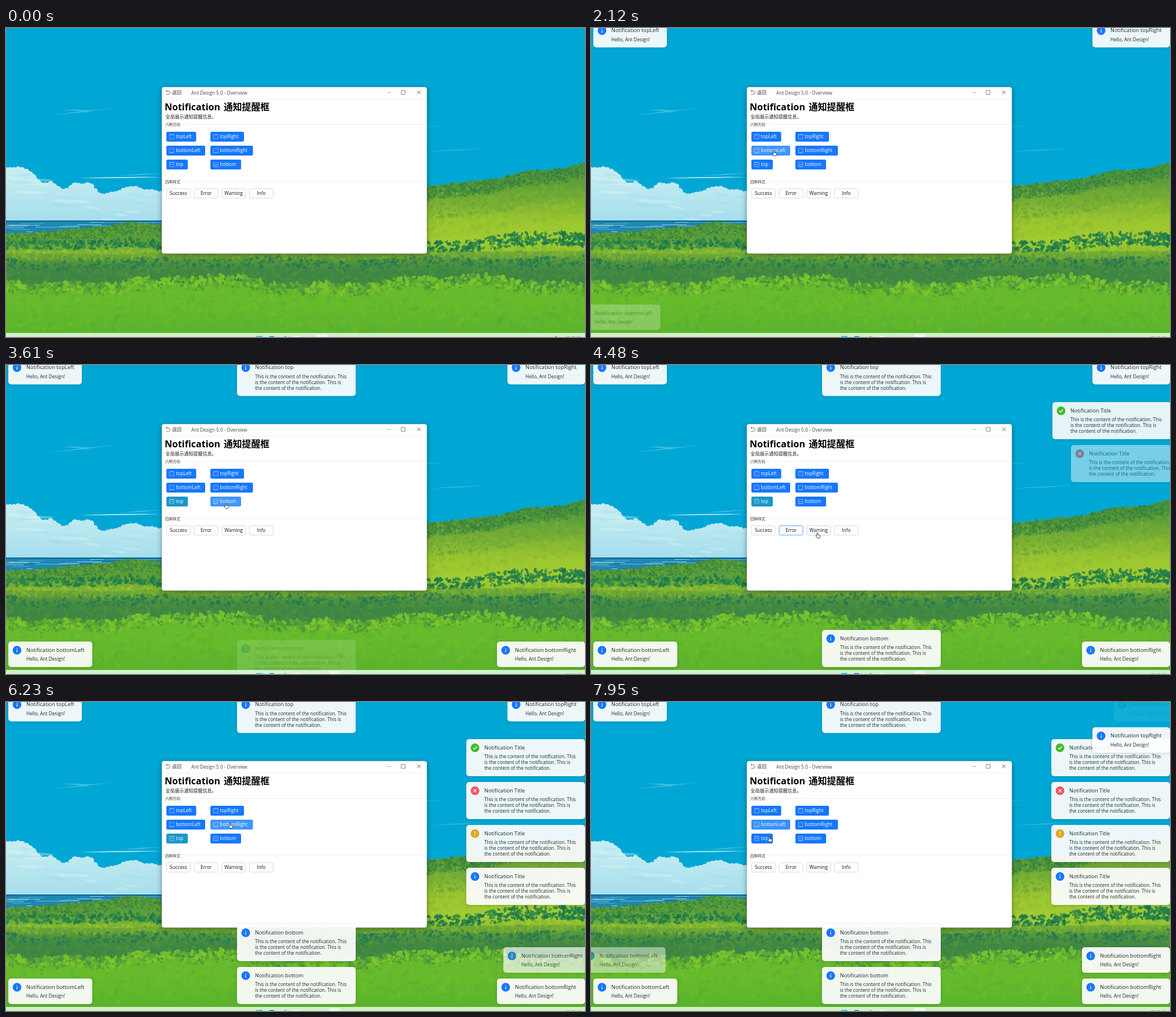
Write an HTML page with a canvas that moves like this. It is 1000x533 px and loops after 8000 ms.

```html
<!DOCTYPE html>
<html lang="zh">
<head>
<meta charset="utf-8">
<title>Notification</title>
<style>
html, body { margin: 0; width: 100%; height: 100%; overflow: hidden; background: #00a7d5; }
canvas, svg { position: absolute; left: 0; top: 0; width: 100%; height: 100%; display: block; }
text { font-family: "Open Sans", "Noto Sans CJK SC", "Noto Sans CJK", sans-serif; font-size: 8.15px; }
.panel { filter: drop-shadow(0 2px 5px rgba(0, 0, 0, .36)); }
.sheet { filter: drop-shadow(0 1px 2.5px rgba(0, 30, 30, .18)); }
</style>
</head>
<body>
<canvas id="scene" width="1000" height="533"></canvas>
<svg id="stage" viewBox="0 0 1000 533" preserveAspectRatio="none"></svg>
<script>
const LOOP = 8000;
const svg = document.getElementById('stage');
const clamp = v => Math.max(0, Math.min(1, v));
const mix = (a, b, k) => a + (b - a) * k;

function add(parent, tag, attrs, content) {
  const node = document.createElementNS('http://www.w3.org/2000/svg', tag);
  for (const key in attrs) node.setAttribute(key, attrs[key]);
  if (content) node.textContent = content;
  parent.appendChild(node);
  return node;
}
const label = (parent, x, y, content, fill = '#1d1d1d', more = {}) =>
  add(parent, 'text', { x, y, fill, ...more }, content);
const stroke = (parent, d, color, width = 1, more = {}) =>
  add(parent, 'path', { d, fill: 'none', stroke: color, 'stroke-width': width, ...more });

// ---------- landscape ----------
function paintScene() {
  const c = document.getElementById('scene').getContext('2d');
  let seed = 41;
  const rnd = () => (seed = (seed * 16807) % 2147483647) / 2147483647;
  const pick = list => list[Math.floor(rnd() * list.length)];

  // Piecewise-linear curve through [x, y] points.
  const curve = pts => x => {
    let i = 1;
    while (i < pts.length - 1 && x > pts[i][0]) i++;
    const [a, b] = [pts[i - 1], pts[i]];
    return mix(a[1], b[1], (x - a[0]) / (b[0] - a[0]));
  };
  function land(x0, x1, top, bottom, stops) {
    const high = Math.min(top(x0), top(x1));
    const fill = c.createLinearGradient(0, high, 0, bottom);
    stops.forEach((s, i) => fill.addColorStop(i / (stops.length - 1), s));
    c.fillStyle = fill;
    c.beginPath();
    c.moveTo(x0, bottom);
    for (let x = x0; x <= x1; x += 4) c.lineTo(x, top(x) + rnd() * 2 - 1);
    c.lineTo(x1, top(x1));
    c.lineTo(x1, bottom);
    c.fill();
  }
  function leaves(n, x0, x1, top, depth, colors, size, alpha = .8) {
    c.globalAlpha = alpha;
    for (let i = 0; i < n; i++) {
      const x = mix(x0, x1, rnd());
      const y = top(x) + rnd() * depth;
      const r = size * (.5 + rnd());
      c.fillStyle = pick(colors);
      c.beginPath();
      c.ellipse(x, y, r, r * .55, rnd() * Math.PI, 0, Math.PI * 2);
      c.fill();
    }
    c.globalAlpha = 1;
  }
  function wisp(x0, y0, x1, y1, width, alpha, color = '190,232,240') {
    c.fillStyle = `rgba(${color},${alpha})`;
    c.beginPath();
    c.moveTo(x0, y0);
    c.quadraticCurveTo((x0 + x1) / 2, (y0 + y1) / 2 - width, x1, y1);
    c.quadraticCurveTo((x0 + x1) / 2, (y0 + y1) / 2 + width, x0, y0);
    c.fill();
  }

  c.fillStyle = '#00a7d5';
  c.fillRect(0, 0, 1000, 533);
  wisp(72, 151, 190, 138, 1, .6);
  wisp(98, 141, 150, 143, 1.3, .6);
  wisp(112, 141, 148, 147, 1, .3);
  wisp(690, 172, 752, 169, .8, .4);
  wisp(728, 213, 830, 208, .8, .6);

  const cloud = curve([[0, 241], [22, 238], [48, 251], [62, 268], [78, 265], [102, 280],
    [116, 268], [145, 267], [163, 287], [190, 282], [214, 272], [240, 278], [270, 281]]);
  const haze = c.createLinearGradient(0, 238, 0, 332);
  haze.addColorStop(0, '#c8edf2');
  haze.addColorStop(.5, '#b9e7ef');
  haze.addColorStop(1, '#a5deec');
  c.fillStyle = haze;
  c.beginPath();
  c.moveTo(0, 332);
  for (let x = 0; x <= 270; x += 3) c.lineTo(x, cloud(x) + rnd() * 3 - 1);
  c.lineTo(270, 332);
  c.fill();
  for (let x = 0; x < 270; x += 7) {
    c.beginPath();
    c.arc(x, cloud(x) + 4, 3 + rnd() * 3, 0, 7);
    c.fill();
  }
  for (let i = 0; i < 26; i++) {
    const x = rnd() * 270 - 20;
    const y = cloud(Math.max(0, x)) + 14 + rnd() * 30;
    wisp(x, y, x + 20 + rnd() * 40, y + rnd() * 6, 5, .35, pick(['222,244,246', '160,220,236']));
  }
  wisp(126, 259, 270, 257, 2, .95);
  wisp(195, 255, 270, 250, 1.6, .5);

  c.fillStyle = '#2087b3';
  c.fillRect(0, 332, 270, 30);
  c.fillStyle = '#0d6797';
  c.fillRect(0, 332, 270, 2);
  for (let i = 0; i < 42; i++) {
    c.fillStyle = pick(['#64bdd6', '#4aa9ca', '#126f9f', '#8bd0df']);
    c.fillRect(rnd() * 250 - 30, 335 + Math.floor(rnd() * 17), 20 + rnd() * 60, 1);
  }

  const dark = ['#3c8540', '#44903c', '#519a39', '#2f7b42'];
  const teal = ['#1f7c4d', '#2a8648', '#338c45', '#187250'];
  const lime = ['#8abd30', '#98c62e', '#7fb433', '#a3cb31'];

  const shore = curve([[0, 355], [60, 352], [110, 347], [180, 341], [212, 334], [275, 341], [500, 340]]);
  const hill = curve([[450, 360], [640, 292], [727, 273], [800, 265], [850, 260], [900, 247], [960, 243], [1000, 232]]);
  land(450, 1000, hill, 400, ['#468f3c', '#5c9d39', '#7cb034', '#9ac630', '#a2cb30', '#8abd30']);
  leaves(1500, 640, 1000, hill, 24, dark, 2.4, .7);
  leaves(900, 640, 1000, x => hill(x) + 20, 38, ['#5f9f39', '#6fa937', '#80b334'], 3, .4);
  leaves(400, 640, 1000, x => hill(x) + 58, 32, lime, 4, .3);
  land(0, 500, shore, 402, ['#4b923f', '#5a9d3a', '#74ad35', '#92c130']);
  leaves(1000, 0, 275, shore, 20, dark.concat('#65a538', '#6fab36'), 2.2, .7);

  const shrubsLeft = curve([[0, 364], [90, 367], [150, 366], [215, 362], [280, 368]]);
  const shrubsRight = curve([[720, 370], [790, 367], [870, 355], [930, 352], [1000, 354]]);
  leaves(300, 0, 275, shrubsLeft, 16, teal, 3, .75);
  leaves(350, 720, 1000, shrubsRight, 22, teal, 3.4, .8);
  leaves(250, 0, 275, x => shrubsLeft(x) + 17, 13, lime, 3, .5);
  leaves(300, 720, 1000, x => shrubsRight(x) + 24, 14, lime, 3, .5);

  const meadow = curve([[0, 388], [200, 390], [300, 386], [600, 388], [800, 386], [1000, 384]]);
  land(0, 1000, meadow, 470, ['#7fb334', '#55973b', '#3f8743', '#3d8544', '#4c973b', '#5eab34']);
  leaves(700, 0, 1000, meadow, 12, ['#8abd30', '#6fa937', '#599a3a'], 3, .5);
  leaves(550, 0, 1000, x => meadow(x) + 10 + 3 * Math.sin(x / 43), 18, ['#21735a', '#2b7d4c', '#357f4b'], 3, .7);
  leaves(900, 0, 1000, x => meadow(x) + 26, 30, ['#3f8743', '#4a9140', '#57993c'], 3.5, .4);

  const front = x => 438 + 7 * Math.sin(x / 71) + 3 * Math.sin(x / 23);
  land(0, 1000, x => front(x) + 6, 533, ['#68b92d', '#66bb2b', '#60b62c', '#5ab22d']);
  leaves(750, 0, 1000, x => front(x) - 4, 18, ['#76c12d', '#7fc72e', '#62ae32', '#53a035'], 4.5, .85);
  leaves(700, 0, 1000, x => front(x) + 12, 66, ['#52a934', '#74c42c', '#5cb32d', '#6bc02b'], 5, .3);
  leaves(220, 0, 1000, x => front(x) + 4, 14, ['#3f8d40', '#358443'], 2.2, .55);
}
paintScene();

// ---------- taskbar ----------
add(svg, 'rect', { x: 0, y: 526, width: 1000, height: 7, fill: '#d2f0c9' });
const marker = add(svg, 'rect', { y: 528, width: 19, height: 5, rx: 2, fill: '#eef6ec' });
[[432, 11, '#19b5e6'], [455, 8, '#1583dc'], [497, 10, '#f8fbf7']].forEach(([x, width, fill]) =>
  add(svg, 'rect', { x, y: 531.5, width, height: 2, fill }));
stroke(svg, 'M481 533l3-1', '#5d6d5c');
const chevron = stroke(svg, 'M948 533l2-1.5 2 1.5', '#4b5b4b', .8);
label(svg, 967, 537, '10:41:41', '#344b38', { style: 'font-size:6.5px' });

// ---------- window ----------
add(svg, 'rect', { x: 269, y: 101.7, width: 458, height: 287.6, rx: 4, fill: '#fff', stroke: '#456', 'stroke-opacity': .4, 'stroke-width': .6, class: 'panel' });
stroke(svg, 'M269.5 122.5H726.5', '#f0f0f0');
stroke(svg, 'M277 108.5h3.5a2.8 2.8 0 0 1 0 5.8h-4M278 106.8l-2 1.7 2 1.7', '#555', .8);
label(svg, 287, 114, '返回', '#333', { style: 'font-size:8px' });
label(svg, 320, 114.5, 'Ant Design 5.0 - Overview', '#444');
stroke(svg, 'M658 111.3h7', '#999', .8);
stroke(svg, 'M682.7 107.7h6.6v6.6h-6.6z', '#666', .8);
stroke(svg, 'M710 108l6 6m0-6l-6 6', '#555', .8);
label(svg, 274, 142, 'Notification', '#000', { style: 'font-size:16px;font-weight:700' });
label(svg, 376, 142, '通知提醒框', '#000', { style: 'font-size:15.8px;font-weight:700' });
label(svg, 275.5, 156, '全局展示通知提醒信息。', '#222', { style: 'font-size:8px' });
[[169, '六种方向'], [267.5, '四种样式']].forEach(([y, name]) => {
  label(svg, 275, y, name, '#333', { style: 'font-size:6.5px' });
  stroke(svg, `M304 ${y - 2.5}H722`, '#f0f0f0');
});

// ---------- buttons ----------
const buttons = [];
function button(name, x, y, w, primary) {
  const box = add(svg, 'rect', { x, y, width: w, height: primary ? 17 : 16, rx: 2.5 });
  if (primary) {
    const [l, t] = [x + 5.5, y + 5];
    stroke(svg, `M${l} ${t}h7.5v7h-7.5z`, '#fff', .8, { 'stroke-dasharray': '1.2 1.2' });
    const edges = [];
    if (/top/.test(name)) edges.push(`M${l} ${t}h7.5`);
    if (/bottom/.test(name)) edges.push(`M${l} ${t + 7}h7.5`);
    if (!/Left|Right/.test(name)) edges.push(`M${l} ${t + 3.5}h7.5`);
    stroke(svg, edges.join(''), '#fff', .4);
    label(svg, x + 16.5, y + 11.3, name, '#fff');
  } else {
    box.setAttribute('fill', '#fff');
    label(svg, x + w / 2, y + 11, name, '#111', { 'text-anchor': 'middle' });
  }
  buttons.push({ name, x, y, w, primary, box });
}
button('topLeft', 277, 179, 51.5, true);
button('topRight', 353, 179, 58, true);
button('bottomLeft', 277, 203, 67, true);
button('bottomRight', 353, 203, 73.5, true);
button('top', 277, 227, 37, true);
button('bottom', 353, 227, 53, true);
['Success', 'Error', 'Warning', 'Info'].forEach((name, i) => button(name, 277.3 + i * 47.7, 277.3, 41, false));

// ---------- notifications ----------
const icons = {
  info: ['#1677ff', 'M0-3.6v1.3M0-1v4.6'],
  success: ['#45bb2c', 'M-3 0l2.2 2.3L3.2-2.5'],
  error: ['#f5545a', 'M-2.5-2.5l5 5m0-5l-5 5'],
  warning: ['#dfa91f', 'M0-3.8v4.7M0 2.4v1.3']
};
const longText = ['This is the content of the notification. This', 'is the content of the notification. This is', 'the content of the notification.'];
const cards = [];
function card(title, x, y, w, start, dx, dy, kind = 'info', leave = Infinity) {
  const tall = w > 200;
  const g = add(svg, 'g', {});
  add(g, 'rect', { width: w, height: tall ? 64 : 44, rx: 5, fill: '#fff', 'fill-opacity': .93, class: 'sheet' });
  const [color, glyph] = icons[kind];
  add(g, 'circle', { cx: 15, cy: 15, r: 7.5, fill: color });
  stroke(g, glyph, '#fff', 1.2, { transform: 'translate(15 15)' });
  label(g, 31, 17.8, 'Notification ' + title, '#1d2b30', { style: 'font-size:9.2px' });
  (tall ? longText : ['Hello, Ant Design!']).forEach((line, i) => label(g, 31, 33.3 + i * 10, line, '#1d2b30'));
  cards.push({ g, x, y, start, dx, dy, leave });
}
const L = -40, R = 40, WIDE = 68;
card('topLeft', 4, -10.5, 127, 1124, L, 0, 'info', 7060);
card('topRight', 866, -10.5, 134, 1530, R, 0, 'info', 7650);
card('bottomLeft', 4, 477, 145, 2060, L, 0);
card('bottomRight', 848, 477, 152, 2600, R, 0);
card('top', 399, -10.5, 205, 3150, 0, -20);
card('bottom', 399, 457, 205, 3580, 0, 20);
card('Title', 795, 64, 205, 4131, WIDE, 0, 'success');
card('Title', 795, 138, 205, 4358, WIDE, 0, 'error');
card('Title', 795, 212, 205, 4770, WIDE, 0, 'warning');
card('Title', 795, 286, 205, 5184, WIDE, 0);
card('bottom', 399, 383, 205, 5560, 0, 20);
card('bottomRight', 848, 423, 152, 6030, R, 0);
card('topRight', 866, 43.5, 134, 6864, R, 0);
card('topLeft', 4, -10.5, 127, 7400, L, 0);
card('bottomLeft', 4, 423, 145, 7830, L, 0);

// ---------- pointer ----------
const ink = { fill: '#fff', stroke: '#222', 'stroke-width': .8, 'stroke-linejoin': 'round' };
const arrow = add(svg, 'path', { d: 'M0 0v8.6l2-1.7h3.5z', ...ink });
const hand = add(svg, 'path', { d: 'M-.9.8Q0-.6.9.8V4l3 .7q1 .3.8 1.6L4 9.3H-.2L-2.8 5.8q0-1.2 1.9-.2z', ...ink });

// Stops of the pointer: arrival time, departure time, x, y.
const stops = [
  [100, 180, 546, 529], [800, 1150, 318, 190], [1330, 1560, 381, 186], [1850, 2150, 316, 211],
  [2400, 2640, 390, 212], [2740, 2745, 323, 232], [2850, 3180, 301, 235], [3400, 3600, 380, 238],
  [4000, 4160, 298, 286], [4280, 4385, 345, 287], [4465, 4800, 391, 289], [5000, 5220, 440, 288],
  [5425, 5600, 380, 240], [5900, 6080, 388, 212], [6700, 6900, 382, 188], [7120, 7400, 316, 189],
  [7700, 7850, 314, 211], [7940, 8000, 308, 232]
];
function pointerAt(t) {
  if (t < stops[0][0]) return null;
  for (let i = 0; i < stops.length; i++) {
    const [arrive, depart, x, y] = stops[i];
    if (t < arrive) {
      const [, from, x0, y0] = stops[i - 1];
      const p = (t - from) / (arrive - from);
      const e = p * p * (3 - 2 * p);
      return { x: mix(x0, x, e), y: mix(y0, y, e) };
    }
    if (t <= depart) return { x, y };
  }
  return null;
}
const over = (b, p) => p && p.x >= b.x && p.x <= b.x + b.w && p.y >= b.y && p.y <= b.y + 17;

// Share of the recent past spent over the button, which gives a soft fade.
function hoverAmount(b, t) {
  let hits = 0;
  for (let back = 40; back <= 240; back += 40) if (over(b, pointerAt(t - back))) hits++;
  return hits / 6;
}
const blend = (a, b, k) => `rgb(${a.map((v, i) => Math.round(mix(v, b[i], k)))})`;
const BLUE = [22, 119, 255], LIGHT = [64, 150, 255], TEAL = [25, 151, 200], GREY = [217, 217, 217];

function render(t) {
  marker.setAttribute('x', t < 500 ? 536 : 558);
  chevron.style.display = t < 400 ? '' : 'none';

  for (const b of buttons) {
    const k = hoverAmount(b, t);
    const cooled = b.name === 'top' && t > 3420 && t < 7870;
    if (b.primary) b.box.setAttribute('fill', blend(cooled ? TEAL : BLUE, LIGHT, cooled ? 0 : k));
    else b.box.setAttribute('stroke', blend(GREY, LIGHT, k));
  }

  for (const n of cards) {
    const away = (1 - clamp((t - n.start) / 420)) ** 2;
    const left = 1 - (1 - clamp((t - n.leave) / 420)) ** 2;
    const off = Math.max(away, left);
    n.g.style.display = off < 1 ? '' : 'none';
    n.g.setAttribute('opacity', 1 - off);
    n.g.setAttribute('transform', `translate(${n.x + n.dx * off} ${n.y + n.dy * off})`);
  }

  const p = pointerAt(t);
  const pointing = buttons.some(b => over(b, p));
  arrow.style.display = p && !pointing ? '' : 'none';
  hand.style.display = pointing ? '' : 'none';
  if (p) for (const node of [arrow, hand]) node.setAttribute('transform', `translate(${p.x} ${p.y})`);
}

const begin = performance.now();
function tick() {
  render((performance.now() - begin) % LOOP);
  requestAnimationFrame(tick);
}
tick();
</script>
</body>
</html>
```
